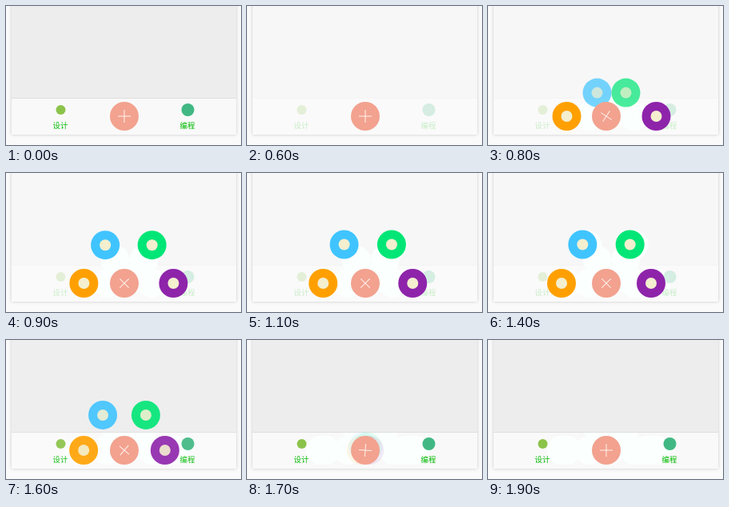
Animation, 294 px wide and 174 px high, one loop 2.8 s. Source, as an HTML page with a canvas:

```html
<!DOCTYPE html>
<html lang="zh">
<head>
<meta charset="utf-8">
<style>
html, body { margin: 0; width: 100%; height: 100%; overflow: hidden; background: #fafafa; }
canvas { display: block; }
</style>
</head>
<body>
<canvas id="stage" width="294" height="174"></canvas>
<script>
const c = document.getElementById('stage').getContext('2d');
const LOOP = 2800, STEP = 100, OPEN = 600, SHUT = 1800;
const CX = 148, CY = 138, R = 18, REACH = 56;

const items = [
  { angle: 180, color: '#ffa000' },
  { angle: 120, color: '#40c4ff' },
  { angle: 60, color: '#00e676' },
  { angle: 0, color: '#8e24aa' }
];

function ramp(t, from, to) {
  return Math.min(1, Math.max(0, (t - from) / (to - from)));
}

function smooth(t, from, to) {
  const p = ramp(t, from, to);
  return p * p * (3 - 2 * p);
}

const stay = t => 1 - smooth(t, 1570, 1730);
const maskAt = t => .8 * (t >= OPEN) * (1 - ramp(t, 1400, 1620));

// The outer buttons leave first; the whole fan then drifts left into place.
function pose({ angle }, t) {
  const a = angle * Math.PI / 180;
  const upper = Math.sin(a) > .1;
  const out = upper ? smooth(t, 640, 920) : ramp(t, OPEN, 800);
  const reach = REACH * out * stay(t);
  const drift = 6.5 * (1 - ramp(t, 800, 1400));
  return {
    x: CX + drift + reach * Math.cos(a) * (upper ? 1.06 : 1),
    y: CY - reach * Math.sin(a),
    alpha: ramp(t, OPEN, upper ? 880 : 800) * stay(t)
  };
}

function disc(x, y, r, color) {
  c.fillStyle = color;
  c.beginPath();
  c.arc(x, y, r, 0, 7);
  c.fill();
}

function rect(x, y, w, h, color) {
  c.fillStyle = color;
  c.fillRect(x, y, w, h);
}

function drawCard(mask) {
  rect(0, 0, 294, 174, '#fafafa');
  c.save();
  c.shadowColor = 'rgba(0,0,0,.2)';
  c.shadowBlur = 4;
  rect(7, -10, 281, 171, '#ededed');
  c.restore();
  rect(7, 115, 281, 46, '#f9f9f9');
  rect(7, 115, 281, 1, '#dedede');
  c.globalAlpha = mask;
  rect(7, 0, 281, 161, '#fafafa');
  c.globalAlpha = 1;
}

// Pale patches left behind by the moving buttons.
function drawTrails(t) {
  c.save();
  if (t >= 1500) {
    c.beginPath();
    c.rect(7, 116, 281, 45);
    c.clip();
  }
  for (let s = OPEN + STEP; s < Math.min(t, SHUT); s += STEP)
    for (const item of items) {
      const { x, y } = pose(item, s);
      disc(x, y, R, '#fbfffe');
    }
  c.restore();
}

function drawTab(x, label, r, color) {
  disc(x + .5, 130, r, color);
  c.fillStyle = '#00b900';
  c.fillText(label, x, 153);
}

function drawTabs(mask) {
  c.globalAlpha = 1 - mask;
  c.font = '500 9.4px "Noto Sans CJK SC", "Noto Sans CJK", sans-serif';
  c.textAlign = 'center';
  drawTab(68, '设计', 6, '#8bc34a');
  drawTab(227, '编程', 8, '#41b883');
  c.globalAlpha = 1;
}

function drawMenu(t) {
  for (const item of items) {
    const { x, y, alpha } = pose(item, t);
    c.globalAlpha = alpha;
    disc(x, y, R, item.color);
    disc(x, y, 7, '#f3efcf');
  }
  c.globalAlpha = 1;
}

function drawToggle(t) {
  disc(CX, CY, R, '#f2a28f');
  c.save();
  c.translate(CX, CY);
  c.rotate(Math.PI / 4 * smooth(t, OPEN, 900) * stay(t));
  c.strokeStyle = '#fff3ee';
  c.beginPath();
  c.moveTo(-8, 0);
  c.lineTo(8, 0);
  c.moveTo(0, -8);
  c.lineTo(0, 8);
  c.stroke();
  c.restore();
}

function draw(now) {
  const t = Math.floor(now % LOOP / STEP) * STEP;
  const mask = maskAt(t);
  drawCard(mask);
  drawTrails(t);
  drawTabs(mask);
  drawMenu(t);
  drawToggle(t);
}

const start = performance.now();
function tick() {
  draw(performance.now() - start);
  requestAnimationFrame(tick);
}
tick();
</script>
</body>
</html>
```
